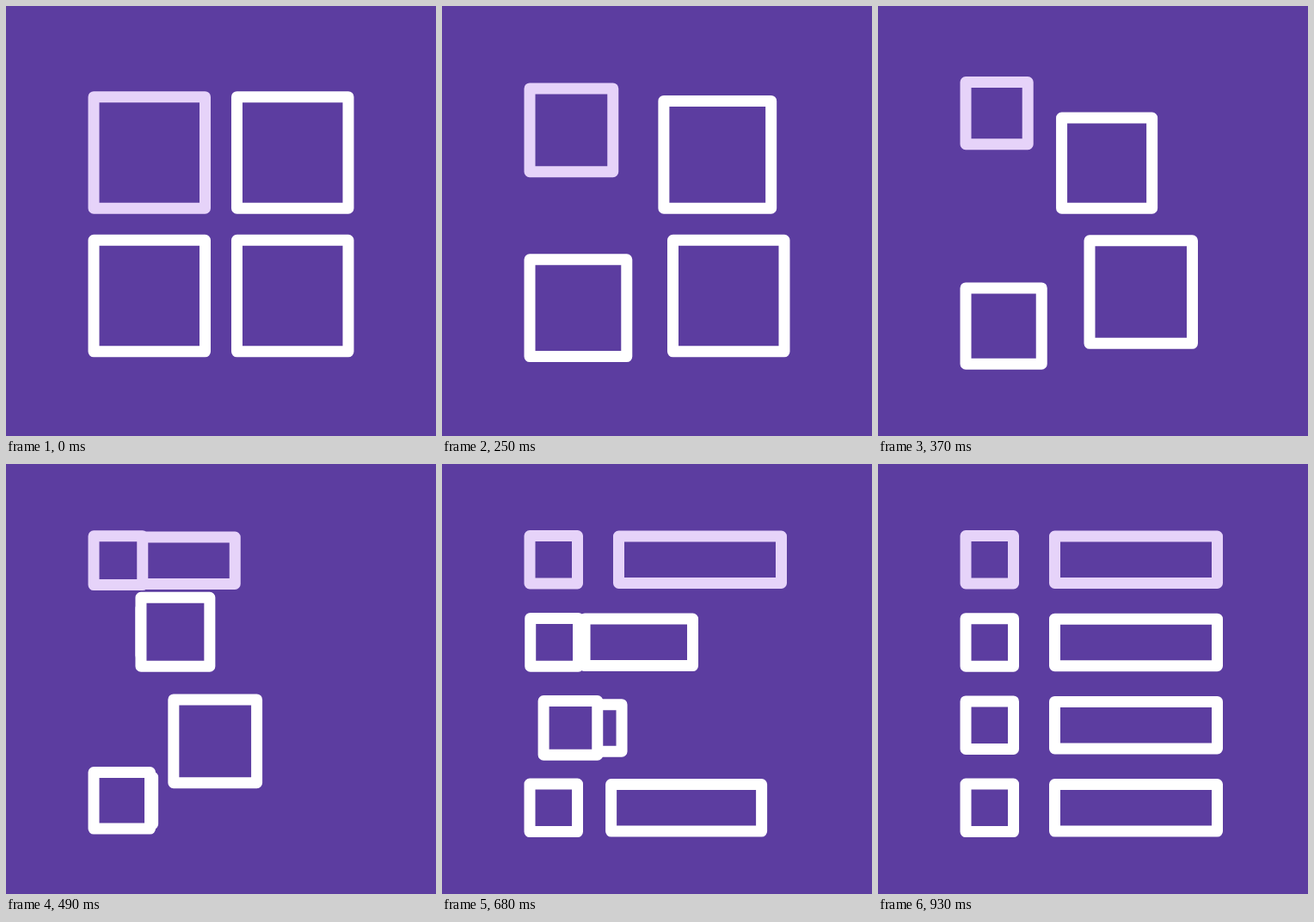
An HTML page that plays this animation: 500x500 px, repeating every 1000 ms.

```html
<!DOCTYPE html>
<html lang="en">
<head>
<meta charset="utf-8">
<title>Grid to list</title>
<style>
  html, body { margin: 0; width: 100%; height: 100%; overflow: hidden; background: #5c3da0; }
  svg { display: block; width: 100%; height: 100%; }
  rect { fill: #5c3da0; stroke: #fff; stroke-width: 13; stroke-linejoin: round; }
  .accent { stroke: #e6d3f9; }
</style>
</head>
<body>
<svg viewBox="0 0 500 500"><g id="bars"></g><g id="tiles"></g></svg>
<script>
  const LOOP = 1000;
  const STROKE = 13;
  // The motion runs in 16 held steps per loop.
  const STARTS = [0, 60, 120, 190, 250, 310, 370, 430, 490, 560, 620, 680, 740, 810, 870, 930];

  const LEFT = 95.5;
  const BIG = 142.5, SMALL = 68.5;
  const BAR_X = 199, BAR_W = 202, BAR_H = 67.5;
  const BAR_TRAVEL = 120;

  // Times below are in steps.
  const STAGGER = 4 / 3, TILE_TIME = 26 / 3;
  const BAR_DELAY = 14 / 3, BAR_TIME = 6;

  const make = (parent, accent) => {
    const el = document.createElementNS('http://www.w3.org/2000/svg', 'rect');
    if (accent) el.setAttribute('class', 'accent');
    return document.getElementById(parent).appendChild(el);
  };

  // Sizes are outer edges, so the path is inset by half the stroke.
  const place = (el, x, y, w, h) => {
    const box = { x: x + STROKE / 2, y: y + STROKE / 2, width: w - STROKE, height: h - STROKE };
    for (const key in box) el.setAttribute(key, Math.max(0.01, box[key]).toFixed(2));
  };

  const mix = (a, b, p) => a + (b - a) * p;
  const ease = s => {
    const c = Math.min(1, Math.max(0, s));
    return c * c * (3 - 2 * c);
  };

  // Grid cell and start order for each list row.
  const rows = [
    { x: LEFT, y: 99.2, order: 0 },
    { x: 262, y: 99.2, order: 2 },
    { x: 262, y: 265.8, order: 3 },
    { x: LEFT, y: 265.8, order: 1 }
  ].map((row, i) => ({
    ...row,
    endY: 77 + i * 96.2,
    bar: make('bars', i === 0),
    tile: make('tiles', i === 0)
  }));

  function draw(step) {
    for (const row of rows) {
      const local = step - row.order * STAGGER;
      const p = ease(local / TILE_TIME);
      const size = mix(BIG, SMALL, p);
      const x = mix(row.x, LEFT, p);
      const y = mix(row.y, row.endY, p);
      place(row.tile, x, y, size, size);

      // The bar slides out from behind its tile, following the tile's centre.
      const q = ease((local - BAR_DELAY) / BAR_TIME);
      const shift = x + size / 2 - (LEFT + SMALL / 2);
      const barX = BAR_X - BAR_TRAVEL * (1 - q) + shift;
      const barW = mix(STROKE, BAR_W, q);
      place(row.bar, Math.max(x, barX), y + (size - BAR_H) / 2, barW, BAR_H);
      row.bar.style.display = q > 0 ? '' : 'none';
    }
  }

  let shown = -1;
  function tick() {
    const t = performance.now() % LOOP;
    const step = STARTS.filter(s => s <= t).length - 1;
    if (step !== shown) draw(shown = step);
    requestAnimationFrame(tick);
  }
  tick();
</script>
</body>
</html>
```
